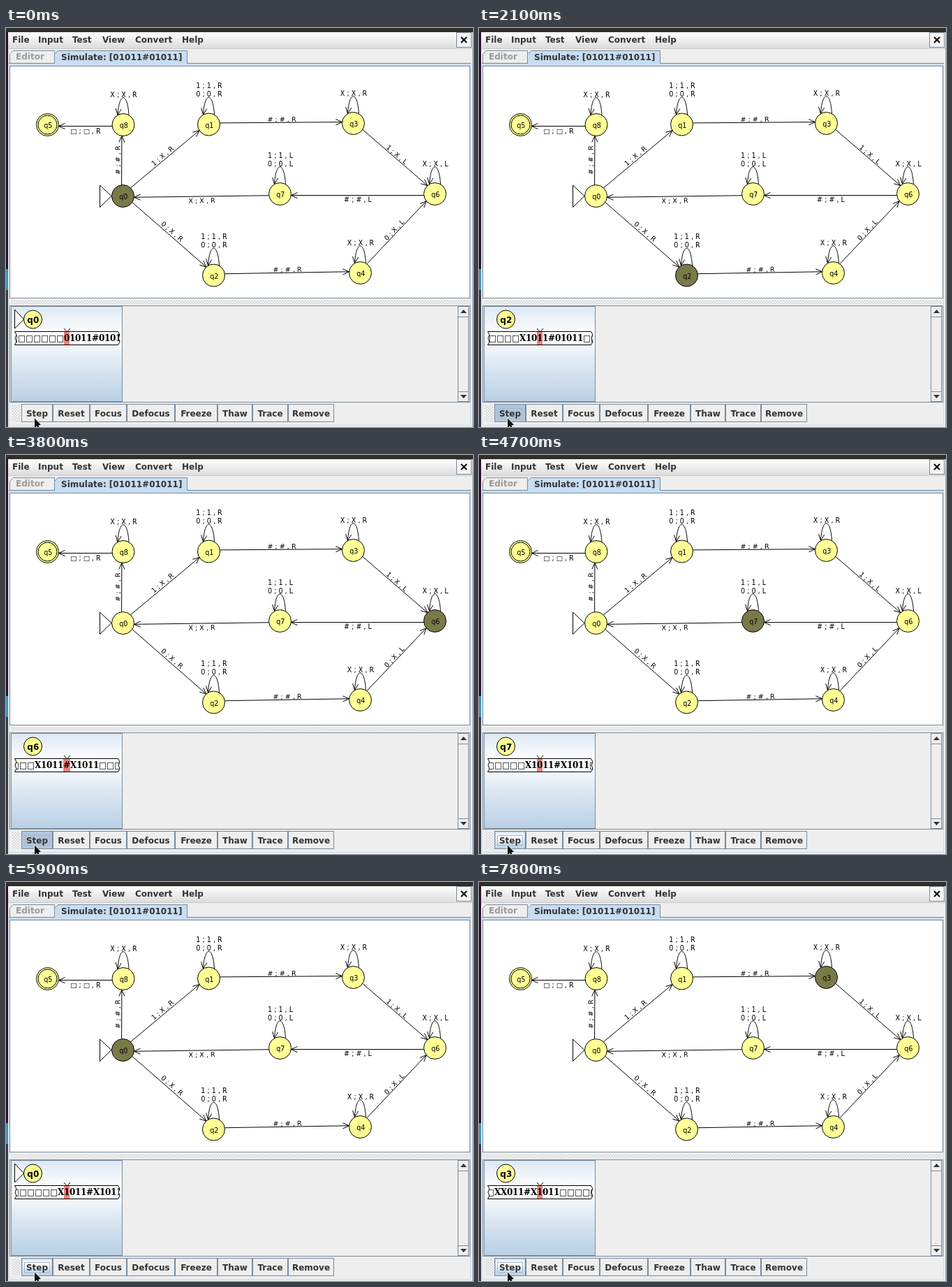
Animation, 669 px wide and 571 px high, one loop 8 s. Source, as an HTML page with a canvas:

```html
<!DOCTYPE html>
<html lang="en">
<head>
<meta charset="utf-8">
<title>Turing machine simulation</title>
<style>
html, body { margin: 0; width: 100%; height: 100%; overflow: hidden; background: #eee; }
canvas { display: block; }
</style>
</head>
<body>
<canvas id="stage" width="669" height="571"></canvas>
<script>
const ctx = document.getElementById('stage').getContext('2d');
const LOOP = 8000;
const BOLD = 'bold 12px "DejaVu Sans", sans-serif';
const TAPE = 'bold 12px "DejaVu Serif", "DejaVu Sans", serif';
const SMALL = '9.6px "DejaVu Sans", sans-serif';
const YELLOW = '#ffff96', DARK = '#7a7a49', EDGE = '#7a8a99', BLUE = '#b8cfe5', INK = '#333';

const nodes = {
  q0: [167.5, 240.5], q1: [290.5, 138], q2: [297.5, 354], q3: [497.5, 136.5],
  q4: [507.5, 350.5], q5: [59.5, 138.5], q6: [614.5, 237.5], q7: [392.5, 237.5], q8: [168, 138.5]
};
// from, to, label, label centre
const edges = [
  ['q8', 'q5', '□ ; □ , R', 114, 147], ['q0', 'q8', '# ; # , R', 160, 189],
  ['q0', 'q1', '1 ; X , R', 224, 183], ['q0', 'q2', '0 ; X , R', 238, 291],
  ['q1', 'q3', '# ; # , R', 395, 130.5], ['q3', 'q6', '1 ; X , L', 560, 181],
  ['q6', 'q7', '# ; # , L', 504, 245.5], ['q7', 'q0', 'X ; X , R', 280.5, 247],
  ['q2', 'q4', '# ; # , R', 403, 345.5], ['q4', 'q6', '0 ; X , L', 556, 289]
];
const loops = {
  q8: ['X ; X , R'], q1: ['0 ; 0 , R', '1 ; 1 , R'], q3: ['X ; X , R'], q7: ['0 ; 0 , L', '1 ; 1 , L'],
  q6: ['X ; X , L'], q2: ['0 ; 0 , R', '1 ; 1 , R'], q4: ['X ; X , R']
};
const buttons = [['Step', 45], ['Reset', 53], ['Focus', 53], ['Defocus', 69],
  ['Freeze', 61], ['Thaw', 50], ['Trace', 51], ['Remove', 66]];

const stepTimes = [600, 1200, 1700, 2200, 2600, 3000, 3500, 3900, 4300, 4700, 5100, 5500,
  5900, 6200, 6600, 6900, 7100, 7700, 7800];
const pressTimes = [300, 1100, 1600, 2100, 2500, 2900, 3300, 3800, 4200, 4600, 5000, 5400,
  5800, 6100, 6500, 6800, 7400];

// rules[state + read] = [next state, write, move], taken from the diagram's labels
const rules = {};
function addRule(from, to, label) {
  const [read, , write, , dir] = label.split(' ');
  rules[from + read] = [to, write, dir === 'R' ? 1 : -1];
}
edges.forEach(([a, b, label]) => addRule(a, b, label));
for (const q in loops) loops[q].forEach(label => addRule(q, q, label));

function runMachine(count) {
  const tape = [...'01011#01011'];
  let state = 'q0', head = 0;
  while (count-- > 0) {
    const [next, write, move] = rules[state + (tape[head] || '□')];
    tape[head] = write;
    state = next;
    head += move;
  }
  return { tape, state, head };
}

function rect(x, y, w, h, fill, stroke) {
  if (fill) { ctx.fillStyle = fill; ctx.fillRect(x, y, w, h); }
  if (stroke) { ctx.strokeStyle = stroke; ctx.strokeRect(x + .5, y + .5, w - 1, h - 1); }
}
function poly(points, fill, stroke, close) {
  ctx.beginPath();
  points.forEach(([x, y]) => ctx.lineTo(x, y));
  if (close) ctx.closePath();
  if (fill) { ctx.fillStyle = fill; ctx.fill(); }
  if (stroke) { ctx.strokeStyle = stroke; ctx.stroke(); }
}
function circle(x, y, r, fill) {
  ctx.beginPath();
  ctx.arc(x, y, r, 0, 7);
  if (fill) { ctx.fillStyle = fill; ctx.fill(); }
  ctx.strokeStyle = '#000';
  ctx.stroke();
}
function text(s, x, y, font = BOLD, color = '#000', align = 'left') {
  ctx.font = font;
  ctx.fillStyle = color;
  ctx.textAlign = align;
  ctx.fillText(s, x, y);
}
function fade(y, h, ...stops) {
  const g = ctx.createLinearGradient(0, y, 0, y + h);
  stops.forEach(([at, color]) => g.addColorStop(at, color));
  return g;
}
const ocean = (y, h) => fade(y, h, [0, '#dde8f3'], [.3, '#fff'], [.6, '#dde8f3'], [1, BLUE]);

function dots(x, y, w, h) {
  for (let j = 0; j < h; j += 2)
    for (let i = j % 4; i < w; i += 4) rect(x + i, y + j, 1, 1, '#b0b6bc');
}
function arrowHead(x, y, angle) {
  const tip = d => [x - 10 * Math.cos(angle + d), y - 10 * Math.sin(angle + d)];
  poly([tip(.42), [x, y], tip(-.42)], null, '#000');
}

function drawWindow() {
  rect(0, 0, 669, 571, '#eee');
  rect(0, 0, 669, 6, '#302e2a');
  rect(0, 6, 3, 565, '#2b1128');
  rect(0, 345, 3, 30, '#3c93b5');
  rect(0, 375, 3, 196, '#3b3a40');
  rect(668, 6, 1, 565, '#aaa');
  rect(3, 6, 665, 24, fade(6, 24, [0, '#fff'], [1, '#dadada']));
  rect(3, 29, 665, 1, '#ccc');
  [['File', 9], ['Input', 46], ['Test', 95], ['View', 138], ['Convert', 185], ['Help', 252]]
    .forEach(([s, x]) => text(s, x, 21, BOLD, INK));
  rect(645, 6, 22, 22, '#f4f4f4', EDGE);
  ctx.lineWidth = 2;
  poly([[652, 13], [660, 21]], null, '#000');
  poly([[660, 13], [652, 21]], null, '#000');
  ctx.lineWidth = 1;

  // tabs
  poly([[5.5, 50], [5.5, 37.5], [10.5, 32.5], [69.5, 32.5], [69.5, 50]], '#eee', EDGE);
  text('Editor', 14, 45, BOLD, '#999');
  rect(4, 50, 662, 519, '#c8ddf2');
  rect(4, 50, 662, 1, EDGE);
  poly([[69.5, 51], [69.5, 37.5], [74.5, 32.5], [259.5, 32.5], [259.5, 51]], '#c8ddf2', EDGE);
  rect(70, 50, 189, 2, '#c8ddf2');
  text('Simulate: [01011#01011]', 79, 46, BOLD, INK);

  rect(5, 54, 660, 514, '#eee');
  rect(5, 54, 660, 333, '#fff', EDGE);
  dots(8, 390, 655, 5);
  rect(5, 397, 660, 139, '#eee', EDGE);

  // scroll bar
  rect(647, 398, 16, 137, '#eee', EDGE);
  rect(647, 413, 16, 108, null, EDGE);
  poly([[651, 408], [660, 408], [655.5, 403]], INK, null);
  poly([[651, 525], [660, 525], [655.5, 530]], INK, null);

  dots(9, 540, 11, 24);
}

function drawDiagram(active) {
  // edges leave and enter a little to one side of the line between centres
  const rim = (q, angle) => [nodes[q][0] + 16 * Math.cos(angle), nodes[q][1] + 16 * Math.sin(angle)];
  for (const [a, b, label, lx, ly] of edges) {
    const angle = Math.atan2(nodes[b][1] - nodes[a][1], nodes[b][0] - nodes[a][0]);
    const start = rim(a, angle - Math.PI / 25), end = rim(b, angle + Math.PI * 26 / 25);
    poly([start, end], null, '#000');
    arrowHead(...end, angle);
    ctx.save();
    ctx.translate(lx, ly);
    ctx.rotate(Math.cos(angle) < 0 ? angle + Math.PI : angle);
    text(label, 0, 3.5, SMALL, '#000', 'center');
    ctx.restore();
  }
  for (const q in loops) {
    const [x, y] = nodes[q];
    ctx.beginPath();
    ctx.moveTo(x + 8, y - 14);
    ctx.bezierCurveTo(x + 6, y - 47, x - 6, y - 47, x - 8, y - 14);
    ctx.stroke();
    arrowHead(x - 8, y - 14, 1.7);
    loops[q].forEach((label, i) => text(label, x + .5, y - 40 - 12 * i, SMALL, '#000', 'center'));
  }
  poly([[134.5, 225], [134.5, 256.5], [151, 240.5]], '#fff', '#000', true);
  for (const q in nodes) {
    const [x, y] = nodes[q];
    circle(x, y, 16, q === active ? DARK : YELLOW);
    if (q === 'q5') circle(x, y, 13.5);
    text(q, x + .8, y + 4.5, SMALL, '#000', 'center');
  }
}

function drawTape({ tape, state, head }) {
  rect(7, 398, 160, 137, ocean(398, 137), EDGE);
  if (state === 'q0') poly([[12.5, 403], [12.5, 430], [25.5, 417]], '#fff', '#000', true);
  circle(38.5, 417, 13, YELLOW);
  text(state, 38.8, 422, BOLD, '#000', 'center');

  const left = [[12.5, 434.5], [15, 439], [13, 444], [15, 449], [12.5, 453.5]];
  const right = left.map(([x, y]) => [x + 148, y]).reverse();
  ctx.save();
  poly([...left, ...right], '#fff', null, true);
  ctx.clip();
  const cell = i => tape[i] || '□';
  const width = c => ({ '□': 11, X: 9, '#': 10 }[c] || 8);
  const start = Math.floor(87 - width(cell(head)) / 2);
  rect(start, 435, width(cell(head)), 18, '#f08078');
  for (let i = head, x = start; x < 164; x += width(cell(i++))) text(cell(i), x, 448, TAPE);
  for (let i = head - 1, x = start; x > 10; i--) text(cell(i), x -= width(cell(i)), 448, TAPE);
  ctx.restore();
  poly([...left, ...right], null, '#000', true);
  poly([[83, 430], [87.5, 435], [92, 430]], null, '#000');
}

function drawButtons(pressed, focused) {
  let x = 22;
  for (const [label, w] of buttons) {
    const isStep = label === 'Step';
    rect(x, 538, w, 26, '#eee', EDGE);
    if (isStep && pressed) rect(x + 1, 539, w - 2, 24, '#b0c6db');
    else if (isStep && focused) rect(x + 1, 539, w - 2, 24, ocean(539, 24), BLUE);
    if (isStep && focused) rect(x + 4, 544, w - 8, 15, null, '#a3b8cc');
    text(label, x + w / 2, 556, BOLD, INK, 'center');
    x += w;
  }
  const pointer = [[40.5, 557.5], [40.5, 573], [44, 570], [47, 576], [50, 575], [47, 569], [51, 568.5]];
  poly(pointer, '#111', '#eee', true);
}

function frame() {
  const t = performance.now() % LOOP;
  const past = list => list.filter(at => at <= t);
  const steps = past(stepTimes), presses = past(pressTimes);
  const machine = runMachine(steps.length);
  drawWindow();
  drawDiagram(machine.state);
  drawTape(machine);
  drawButtons((presses.pop() || 0) > (steps.pop() || 0), t >= pressTimes[0]);
  requestAnimationFrame(frame);
}
frame();
</script>
</body>
</html>
```
